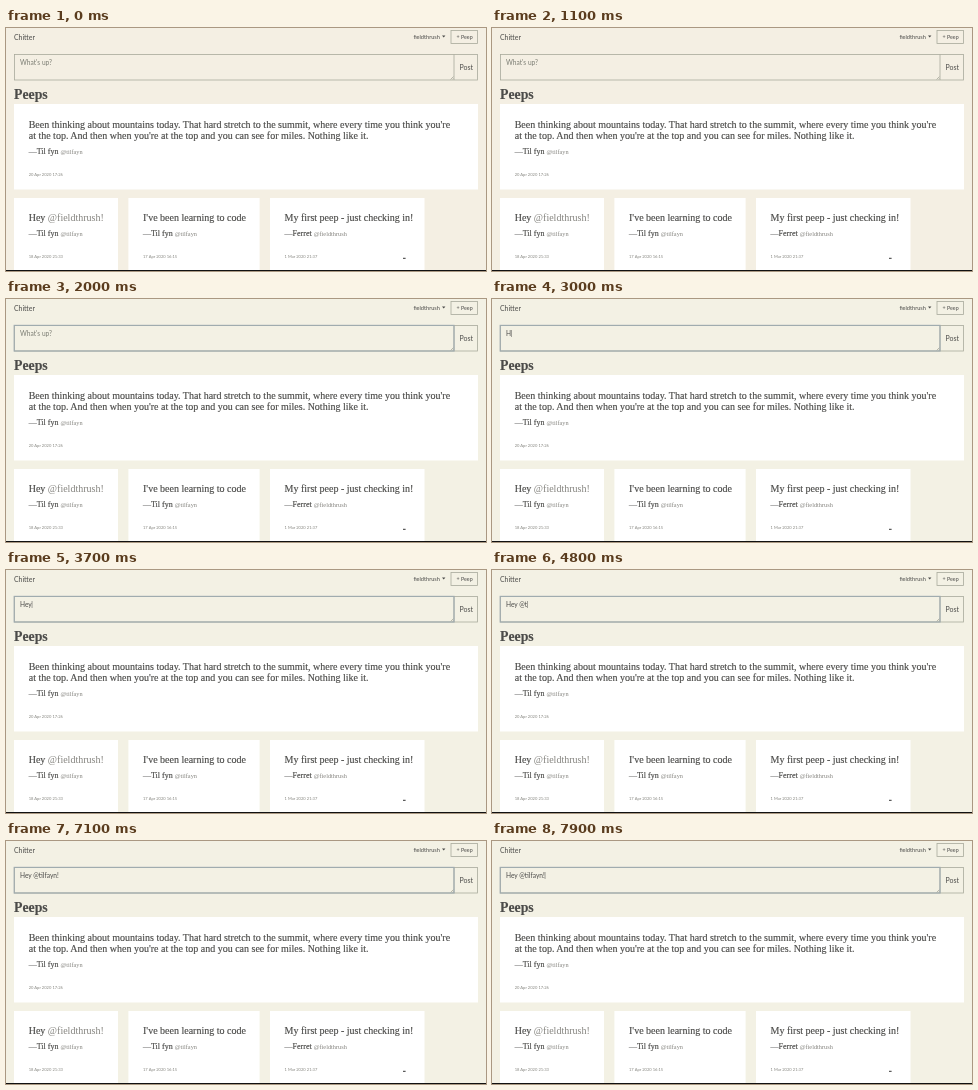
An HTML page that plays this animation: 480 px wide and 243 px high, repeating every 8 s.

```html
<!DOCTYPE html>
<html lang="en">
<head>
<meta charset="utf-8">
<title>Chitter</title>
<style>
  html, body { margin: 0; height: 100%; overflow: hidden; background: #f4efe3; }
  svg { display: block; width: 100vw; height: 100vh; }
  text { font-family: Lato, sans-serif; fill: #4b4b49; white-space: pre; }
  .slab { font: 10px "Liberation Serif", serif; stroke: #4b4b49; stroke-width: .15; }
  .name { font-size: 8px; }
  .handle { font-size: 6.3px; }
  .soft { fill: #85847f; stroke: none; }
  .date { font-size: 4.1px; fill: #85857f; }
  .box { fill: none; stroke: #a9aa9c; stroke-width: .8; }
</style>
</head>
<body>
<svg viewBox="0 0 480 243" preserveAspectRatio="none">
  <rect id="page" width="480" height="243" fill="#f4efe3"/>

  <text x="8" y="11.5" font-size="6.9">Chitter</text>
  <text x="407.4" y="10.6" font-size="5.6">fieldthrush</text>
  <path d="M436 7.5h3.4l-1.7 2z" fill="#4b4b49"/>
  <rect class="box" x="445" y="2.5" width="26.5" height="13"/>
  <text x="450.6" y="11" font-size="5.3">+ Peep</text>

  <rect class="box" x="8.5" y="26.5" width="463" height="25.5"/>
  <path class="box" d="M448 26.5V52M444.5 51.5l3-3M446.3 51.5l1.2-1.2"/>
  <rect id="focus" x="8.2" y="26.4" width="439.8" height="25.6" fill="none" stroke="#a0acaf" stroke-width="1.2"/>
  <text id="hint" x="14" y="37" font-size="6.6" style="fill:#7b7d73">What's up?</text>
  <text id="typed" x="14" y="37" font-size="6.6"></text>
  <rect id="caret" y="31" width=".6" height="7" fill="#6b6b68"/>
  <text x="453.6" y="42" font-size="7">Post</text>

  <text class="slab" x="8" y="70.5" style="font-size:13.8px;font-weight:bold">Peeps</text>

  <g fill="#fff">
    <rect x="8" y="76" width="464" height="85.5"/>
    <rect x="8" y="170" width="104" height="72"/>
    <rect x="122.4" y="170" width="131.2" height="72"/>
    <rect x="264" y="170" width="154.5" height="72"/>
  </g>
  <g id="peeps"></g>
  <rect x="397" y="229.8" width="2.6" height="1" fill="#333"/>
  <rect y="242" width="480" height="1" fill="#111"/>
</svg>
<script>
const $ = id => document.getElementById(id);

function peep(x, y, lines, name, handle, date) {
  const body = lines.map((line, i) =>
    `<text class="slab" x="${x}" y="${y + i * 10.6}">${line}</text>`).join("");
  const nameY = y + lines.length * 10.6 + 4.6;
  return body +
    `<text class="slab name" x="${x}" y="${nameY}">—${name} <tspan class="handle soft">@${handle}</tspan></text>` +
    `<text class="date" x="${x}" y="${nameY + 22}">${date}</text>`;
}

$("peeps").innerHTML =
  peep(22.7, 100, [
    "Been thinking about mountains today. That hard stretch to the summit, where every time you think you're",
    "at the top. And then when you're at the top and you can see for miles. Nothing like it."
  ], "Til fyn", "tilfayn", "20 Apr 2020 17:26") +
  peep(22.7, 193, ['Hey <tspan class="soft">@fieldthrush!</tspan>'],
    "Til fyn", "tilfayn", "18 Apr 2020 21:33") +
  peep(137, 193, ["I've been learning to code"], "Til fyn", "tilfayn", "17 Apr 2020 16:15") +
  peep(278.6, 193, ["My first peep - just checking in!"], "Ferret", "fieldthrush", "1 Mar 2020 21:37");

const LOOP = 8000, FOCUS = 1500, BLINK = 500;
const message = "Hey @tilfayn!";
// time of each key press
const keys = [3000, 3300, 3700, 4300, 4500, 4800, 5000, 5100, 5300, 5450, 5600, 5800, 6600];

function mix(a, b, k) {
  return `rgb(${a.map((v, i) => Math.round(v + (b[i] - v) * k))})`;
}

function draw(t) {
  const fade = Math.min(1, Math.max(0, (t - 1100) / 500));
  $("page").setAttribute("fill", mix([244, 239, 227], [243, 241, 228], fade));
  $("focus").setAttribute("opacity", fade);

  const count = keys.filter(k => k <= t).length;
  const typed = $("typed");
  typed.textContent = message.slice(0, count);
  $("hint").setAttribute("opacity", count ? 0 : 1);

  const since = t - (count ? keys[count - 1] : FOCUS);
  const lit = since >= 0 && Math.floor(since / BLINK) % 2 === 0;
  $("caret").setAttribute("x", 14 + (count ? typed.getComputedTextLength() : 0));
  $("caret").setAttribute("opacity", lit ? 1 : 0);
}

let start;
function loop(now) {
  start ??= now;
  draw((now - start) % LOOP);
  requestAnimationFrame(loop);
}
requestAnimationFrame(loop);
</script>
</body>
</html>
```
